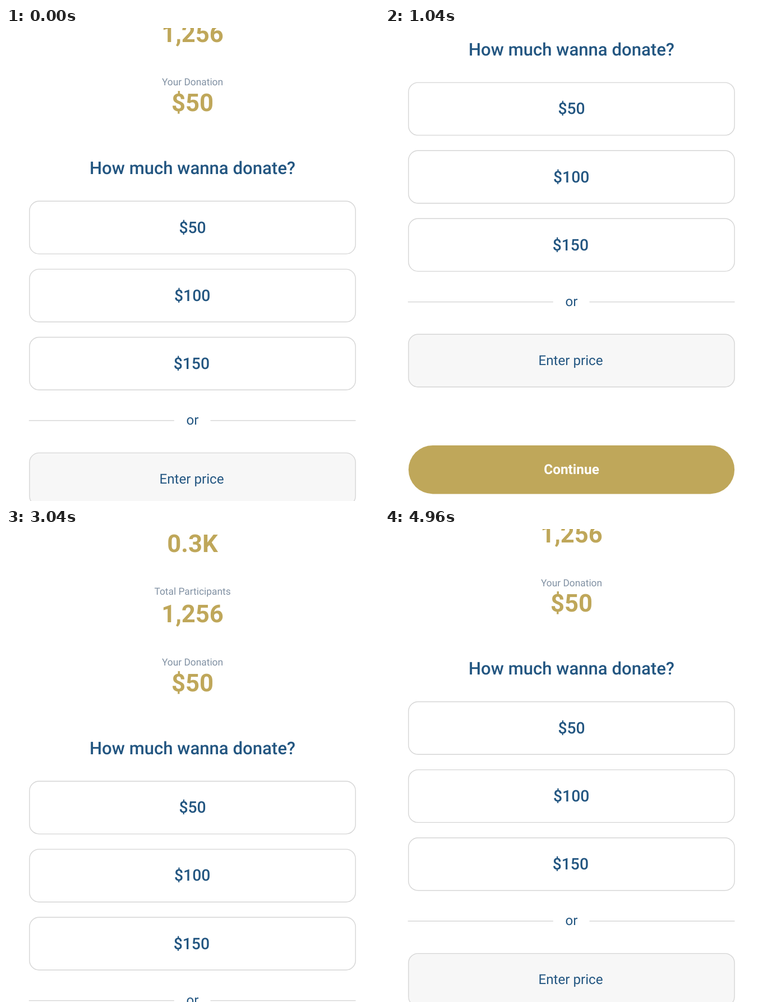
Write an HTML page with a canvas that moves like this. It is 665 px wide and 842 px high and loops after 5 s.

```html
<!DOCTYPE html>
<html lang="en">
<head>
<meta charset="utf-8">
<title>Donation form</title>
<style>
  html, body { margin: 0; width: 100%; height: 100%; overflow: hidden; background: #fff; }
  canvas { display: block; }
</style>
</head>
<body>
<canvas id="stage" width="665" height="842"></canvas>
<script>
const ctx = document.getElementById('stage').getContext('2d');
const WIDTH = 665, HEIGHT = 842, LOOP = 5000, STEP = 40;
const NAVY = '#235681', GOLD = '#bfa75a', GREY = '#8191a3', BORDER = '#d5d5d5';
const CENTER = 332.5, LEFT = 41.9, BOX_WIDTH = 581.2;

// Scroll moves: start and end time in ms, start and end offset in px
const MOVES = [
  { t0: 0, t1: 1036, y0: 215.6, y1: 426.8 },
  { t0: 2072, t1: 3392, y0: 426.8, y1: 0 },
  { t0: 4040, t1: 5000, y0: 0, y1: 217.5 }
];

const smooth = u => u * u * (3 - 2 * u);

function scrollAt(time) {
  const move = MOVES.filter(m => m.t0 <= time).pop();
  const u = Math.min(1, (time - move.t0) / (move.t1 - move.t0));
  return move.y0 + (move.y1 - move.y0) * smooth(u);
}

function text(str, baseline, size, weight, color, x = CENTER) {
  ctx.font = `${weight} ${size}px Roboto, sans-serif`;
  ctx.fillStyle = color;
  ctx.fillText(str, x, baseline);
}

function box(y, height, radius, fill, stroke) {
  ctx.beginPath();
  ctx.roundRect(LEFT, y, BOX_WIDTH, height, radius);
  ctx.fillStyle = fill;
  ctx.fill();
  if (!stroke) return;
  ctx.strokeStyle = stroke;
  ctx.lineWidth = 1.4;
  ctx.stroke();
}

function stat(label, labelY, value, valueY) {
  text(label, labelY, 17.35, 400, GREY);
  text(value, valueY, 43.6, 700, GOLD);
}

function option(label, index, x) {
  const y = 523.9 + index * 121.1;
  box(y, 93.8, 17, '#fff', BORDER);
  text(label, y + 56.3, 28.3, 500, NAVY, x);
}

function divider(y) {
  ctx.fillStyle = BORDER;
  ctx.fillRect(40.8, y - 0.7, 259, 1.4);
  ctx.fillRect(364.5, y - 0.7, 259, 1.4);
  text('or', y + 7.4, 24.2, 400, NAVY);
}

function drawPage() {
  stat('Total Money Raised', 65, '0.3K', 115.8);
  stat('Total Participants', 191.5, '1,256', 240.6);
  stat('Your Donation', 318, '$50', 363.8);
  text('How much wanna donate?', 475.6, 31.1, 500, NAVY);
  option('$50', 0);
  option('$100', 1, CENTER - 0.3);
  option('$150', 2, CENTER - 1.7);
  divider(914.4);
  box(972, 93.8, 17, '#f7f7f7', BORDER);
  text('Enter price', 1026.6, 24.2, 400, NAVY, CENTER - 1.5);
  box(1169.7, 86.5, 43.25, GOLD);
  text('Continue', 1220.9, 24.4, 700, '#fff');
}

function render(now) {
  const time = Math.floor((now % LOOP) / STEP) * STEP;
  ctx.fillStyle = '#fff';
  ctx.fillRect(0, 0, WIDTH, HEIGHT);
  ctx.save();
  ctx.translate(0, -scrollAt(time));
  drawPage();
  ctx.restore();
}

ctx.textAlign = 'center';
ctx.textBaseline = 'alphabetic';
ctx.textRendering = 'geometricPrecision';

let start;
function tick(now) {
  start ??= now;
  render(Math.max(0, now - start));
  requestAnimationFrame(tick);
}
render(0);
requestAnimationFrame(tick);
</script>
</body>
</html>
```
